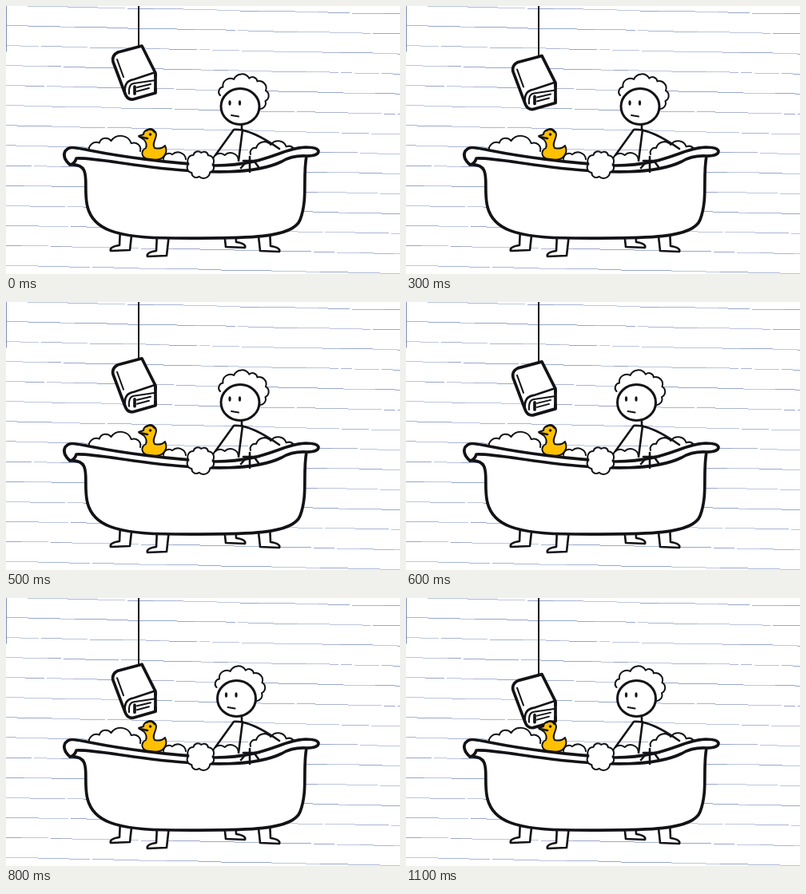
An HTML page that plays this animation: 493 px wide and 336 px high, repeating every 1200 ms.

```html
<!DOCTYPE html>
<html lang="en">
<head>
<meta charset="utf-8">
<title>Bath time</title>
<style>
html, body { margin: 0; width: 100%; height: 100%; overflow: hidden; background: #fff; }
svg { display: block; width: 493px; height: 336px; }
.ink { fill: none; stroke: #131317; stroke-width: 2.6; stroke-linecap: round; stroke-linejoin: round; }
.paper { fill: #fff; }
.thin { stroke-width: 2; }
.bold { stroke-width: 3.7; }
.dot { fill: #131317; stroke: none; }
#rules { stroke-width: 1; stroke-linecap: butt; shape-rendering: crispEdges; }
</style>
</head>
<body>
<svg viewBox="0 0 493 336" class="ink">
  <g id="rules"></g>
  <path d="M.5 0V57" stroke="#7f8db8" stroke-width="1"/>

  <g id="book">
    <path class="thin" d="M166 -60V50"/>
    <path class="paper bold" d="M170 50L140 58Q132 62 134 70L149 110Q152 118 159 117L187 109V84Z"/>
    <path d="M149 109Q147 94 160 92L187 83"/>
    <path class="thin" d="M139 67L147 89M154 110Q153 98 160 97L187 93M164 102L181 98M164 107L179 103"/>
    <path class="bold" d="M161 101V110M187 86V88M187 104V108"/>
  </g>

  <g id="feet" class="paper"></g>
  <path class="paper bold" d="M80 199C110 197 95 225 102 252S135 291 210 291S358 294 368 268S371 215 376 188"/>
  <g id="foam" class="paper thin"></g>

  <path d="M295 148V155M262 187L285 155Q305 153 342 179M296 155L291 194"/>
  <g id="head">
    <path id="hair" class="paper thin"/>
    <ellipse class="paper" cx="293" cy="126" rx="24" ry="22.500" stroke-width="3"/>
    <ellipse class="dot" cx="280" cy="121.500" rx="1.600" ry="3.200"/>
    <ellipse class="dot" cx="292.500" cy="121.500" rx="1.600" ry="3.200"/>
    <path class="thin" d="M282 137L291 138.500"/>
  </g>

  <path fill="#ffc000" class="thin" d="M172 161C172 153 187 152 188 161C188 168 182 172 186 178Q194 180 199 175C203 184 198 193 186 193C170 194 166 183 175 178Q177 173 173 168L166 163Z"/>
  <path d="M176 156Q182 152 186 158M167 164L177 166"/>
  <circle class="dot" cx="180.500" cy="161" r="1.800"/>

  <path class="paper bold" d="M80 199Q86 198 88 191C110 190 150 199 200 204S310 212 345 195Q358 187 376 188Q391 188 391 182Q390 177 375 177C345 178 325 200 262 200C200 197 140 188 110 182S80 176 74 182Q70 190 80 199Z"/>
  <path d="M297 194H317M305 189V208M300 196L294 203M311 195L316 202"/>
  <path id="puff" class="paper thin"/>
</svg>
<script>
const $ = id => document.getElementById(id);

let seed = 7;
const rand = () => (seed = seed * 16807 % 2147483647) / 2147483647;

// n uneven bulges along an ellipse, angles in degrees.
function cloud(cx, cy, rx, ry, n, from = 180, to = 360) {
  let d = '', px, py;
  for (let i = 0; i <= n; i++) {
    const jitter = i % n ? (rand() - 0.5) * 0.4 : 0;
    const a = (from + (to - from) * (i + jitter) / n) * Math.PI / 180;
    const x = cx + rx * Math.cos(a), y = cy + ry * Math.sin(a);
    const r = 0.56 * Math.hypot(x - px, y - py);
    d += i ? `A${r} ${r} 0 0 1 ${x} ${y}` : `M${x} ${y}`;
    px = x;
    py = y;
  }
  return d;
}

const path = (d, attrs = '') => `<path d="${d}" ${attrs}/>`;

// Ruled paper: sloping lines of level, broken pen strokes.
const shades = ['#a9b5d3', '#98a6cc', '#bcc6de'];
let rules = '';
for (let row = -1; row < 14; row++) {
  for (let x = 0; x < 493;) {
    const len = 10 + rand() * 34;
    const y = Math.round(24 + row * 25.05 + (x + len / 2) * 0.0215) + 0.5;
    rules += path(`M${x} ${y}h${len}`, `stroke="${shades[Math.floor(rand() * 3)]}"`);
    x += len + (rand() < 0.2 ? 3 : 0);
  }
}
$('rules').innerHTML = rules;

const foot = (x, y, side) =>
  path('M-1 -10L2 17L26 18Q28 13 15 11L14 -10', `transform="translate(${x} ${y}) scale(${side} 1)"`);
$('feet').innerHTML = foot(157, 289, -1) + foot(203, 296, -1) + foot(273, 285, 1) + foot(316, 290, 1);

$('foam').innerHTML = path(cloud(136, 182, 32, 13, 4)) + path(cloud(211, 192, 14, 6, 2)) +
  path(cloud(275, 193, 16, 6, 2)) + path(cloud(334, 186, 28, 12, 4));
$('hair').setAttribute('d', cloud(297, 112, 29, 22, 7, 180, 410));
$('puff').setAttribute('d', cloud(243.5, 199, 15, 15, 8, 0, 360));

// The book sinks in ten steps a second; the head turns halfway.
function draw(now) {
  const step = Math.floor(now % 1200 / 100);
  $('book').setAttribute('transform', `translate(0 ${step * 4.15})`);
  $('head').setAttribute('transform', `translate(${step < 6 ? 0 : -4.5} 0)`);
  requestAnimationFrame(draw);
}
draw(0);
</script>
</body>
</html>
```
